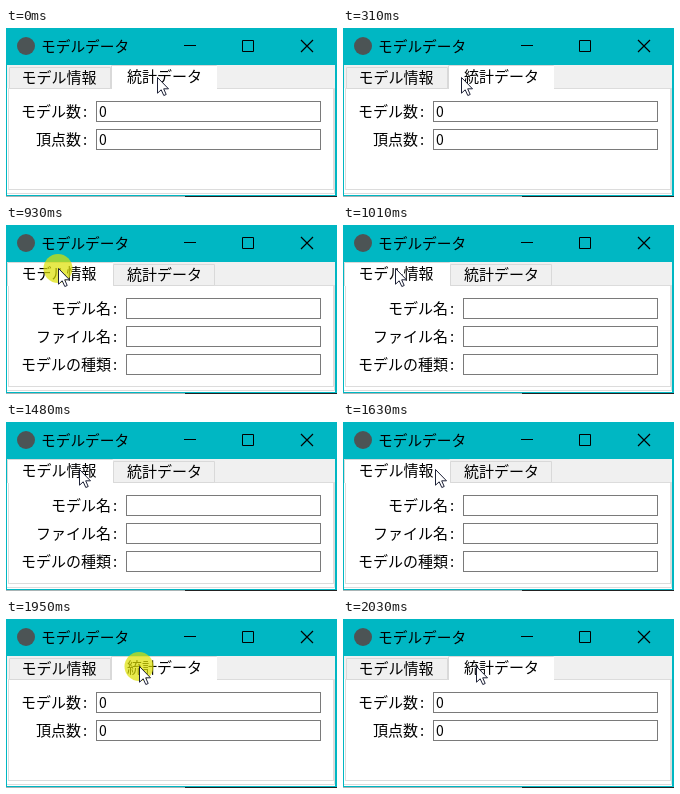
Write an HTML page that moves like this. It is 331 px wide and 169 px high and loops after 2110 ms.

```html
<!DOCTYPE html>
<html lang="ja">
<head>
<meta charset="utf-8">
<style>
html, body { margin: 0; width: 100%; height: 100%; overflow: hidden; background: #f0f0f0; }
svg { display: block; }
text { font: 15px "Noto Sans CJK JP", "Noto Sans CJK", sans-serif; fill: #000; white-space: pre; }
.title { font-size: 14.7px; }
.line { fill: none; stroke: #000; }
.edge { fill: none; stroke: #dcdcdc; }
.tab { stroke: #d9d9d9; }
.field { fill: #fff; stroke: #7a7a7a; }
</style>
</head>
<body>
<svg width="331" height="169" viewBox="0 0 331 169">
  <rect width="331" height="169" fill="#00b7c3"/>
  <rect x="1" y="37" width="328" height="130" fill="#f0f0f0"/>
  <rect x="1" y="60" width="328" height="107" fill="#fff"/>
  <rect y="168" width="179" height="1" fill="#a9b4b5"/>
  <rect x="179" y="168" width="152" height="1" fill="#222"/>

  <circle cx="20" cy="18" r="9" fill="#4c5455"/>
  <text class="title" x="35" y="23.5">モデルデータ</text>
  <path class="line" d="M178 17.5h12M236.5 12.5h11v11h-11z"/>
  <path class="line" stroke-width="1.2" d="M295 12l12 12m0-12l-12 12"/>

  <rect class="edge" x="2.5" y="60.5" width="325" height="101"/>
  <path class="edge" d="M1 165.5h327.5V60"/>
  <g id="tabs"></g>
  <g id="pages"></g>
  <circle id="click" r="14.5" fill="#dde000" fill-opacity=".7"/>
  <path id="cursor" d="M.5 .5V16.2L4.2 12.8 6.8 18.5 9.2 17.5 6.7 11.8H11.5Z" fill="#fff" stroke="#1c2036"/>
</svg>
<script>
const LOOP = 2110;
const $ = id => document.getElementById(id);

// start time, pointer x, pointer y, open tab, clicking
const steps = [
  [0, 151, 49, 1], [230, 141, 49, 1], [310, 118, 49, 1], [380, 89, 48, 1],
  [460, 64, 46, 1], [550, 52, 43, 1], [930, 52, 43, 0, true], [1010, 52, 43, 0],
  [1480, 73, 47, 0], [1560, 92, 47, 0], [1640, 109, 47, 0], [1720, 123, 47, 0],
  [1800, 133, 47, 0], [1950, 133, 47, 1, true], [2030, 133, 47, 1]
];

const tabs = [
  { name: "モデル情報", x: 3, w: 102, textX: 15.5 },
  { name: "統計データ", x: 107, w: 102, textX: 121 }
];
const pages = [
  { left: 120, rows: ["モデル名", "ファイル名", "モデルの種類"], value: "" },
  { left: 90, rows: ["モデル数", "頂点数"], value: "0" }
];

function tabMarkup(tab, open, hover) {
  const { x, w, textX, name } = tab;
  const shape = open
    ? `M${x - 1.5} 61V37.5H${x + w + 1.5}V61`
    : `M${x + .5} 60.5V39.5H${x + w - .5}V60.5Z`;
  const fill = open ? "#fff" : hover ? "#d8eaf9" : "#f0f0f0";
  // the open tab hides the panel edge and the gap to its neighbour
  const cover = open ? `<rect x="${x - 1}" y="38" width="${w + 3}" height="23" fill="#fff"/>` : "";
  return `<path class="tab" d="${shape}" fill="${fill}"/>${cover}
    <text x="${textX}" y="${open ? 53.5 : 54.5}">${name}</text>`;
}

function pageMarkup({ left, rows, value }) {
  return rows.map((label, i) => {
    const y = 73.5 + 28 * i;
    return `<text x="${left - 15}" y="${y + 15}" text-anchor="end">${label}</text>
      <text x="${left - 13}" y="${y + 15}">:</text>
      <rect class="field" x="${left + .5}" y="${y}" width="${314 - left}" height="20"/>
      <text x="${left + 3}" y="${y + 15.5}" style="font-size:14px">${value}</text>`;
  }).join("");
}

let shown;
function draw(now) {
  const t = now % LOOP;
  const step = steps.findLast(s => s[0] <= t);
  if (step === shown) return;
  shown = step;
  const [, x, y, open, clicking] = step;
  const markup = tabs.map((tab, i) =>
    tabMarkup(tab, i === open, x >= tab.x && x < tab.x + tab.w));
  $("tabs").innerHTML = markup[1 - open] + markup[open];
  $("pages").innerHTML = pageMarkup(pages[open]);
  $("cursor").setAttribute("transform", `translate(${x} ${y})`);
  $("click").setAttribute("transform", `translate(${x} ${y + .5})`);
  $("click").style.display = clicking ? "" : "none";
}

const start = performance.now();
function tick() {
  draw(performance.now() - start);
  requestAnimationFrame(tick);
}
tick();
</script>
</body>
</html>
```
